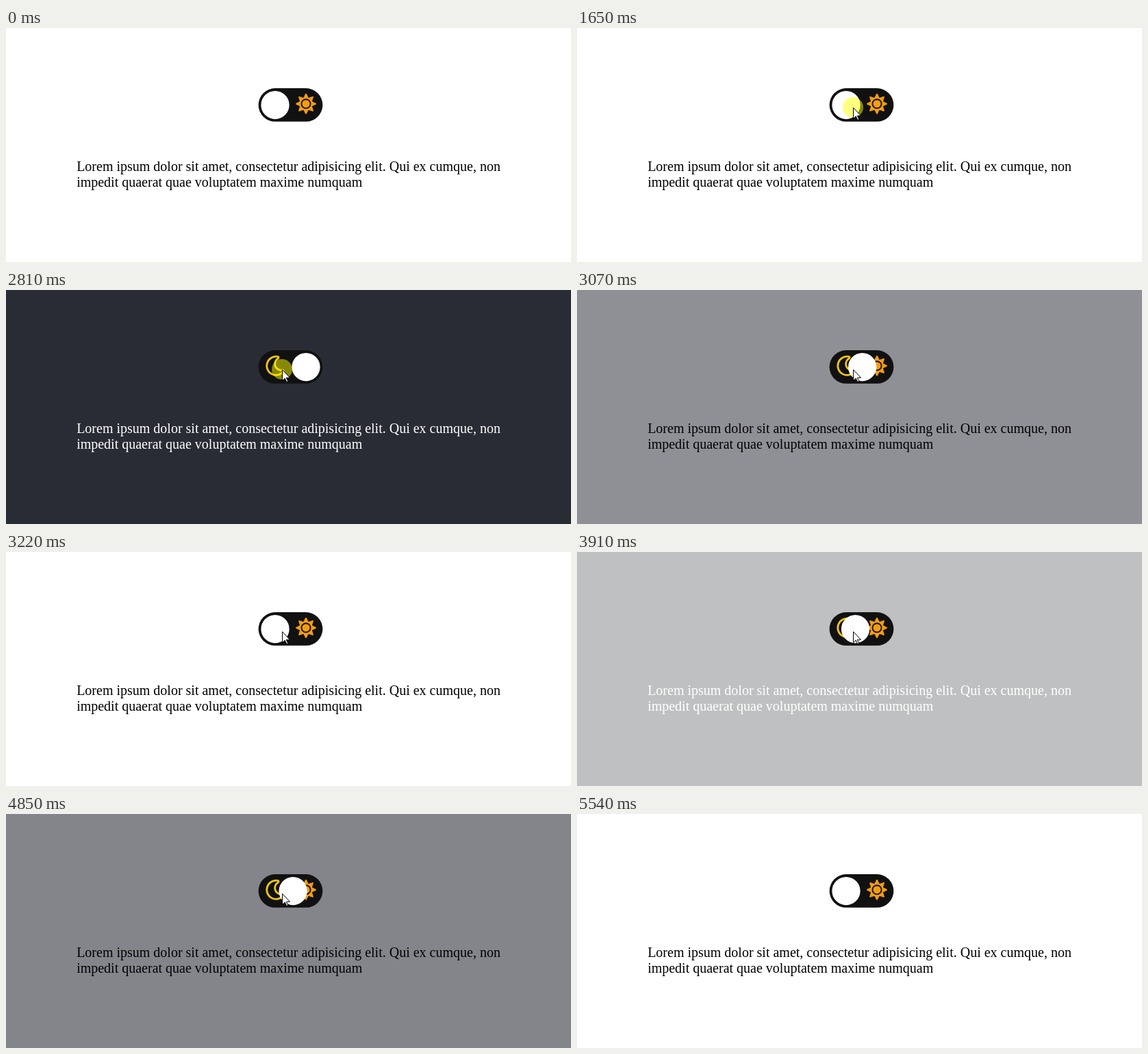
Recreate the animation shown at these times as an HTML page. Size 825x342 px, loop 6250 ms.

```html
<!DOCTYPE html>
<html lang="en">
<head>
<meta charset="utf-8">
<title>Dark mode toggle</title>
<style>
  html, body { margin: 0; width: 100%; height: 100%; overflow: hidden; background: #fff; }
  p {
    position: absolute; left: 103.125px; top: 191px; margin: 0; white-space: nowrap;
    font: 20px/23px "Liberation Serif", "Times New Roman", serif;
  }
  svg { position: absolute; left: 0; top: 0; }
</style>
</head>
<body>
<p>Lorem ipsum dolor sit amet, consectetur adipisicing elit. Qui ex cumque, non<br>impedit quaerat quae voluptatem maxime numquam</p>
<svg width="825" height="342">
  <rect x="368.6" y="88.1" width="93.75" height="48.75" rx="24.375" fill="#111"/>
  <path transform="translate(378 95.8) scale(.0586)" fill="#111" stroke="#f1c40f" stroke-width="96"
    stroke-linejoin="round" paint-order="stroke"
    d="M317 51.5A181 181 0 0 0 440.6 387A208 208 0 1 1 317 51.5z"/>
  <g transform="translate(438 110.8) scale(.0586)" fill="#f39c12">
    <polygon id="rays" stroke="#f39c12" stroke-width="34" stroke-linejoin="round"/>
    <circle r="112" stroke="#111" stroke-width="32"/>
  </g>
  <circle id="ball" cy="112.5" r="20.625" fill="#fff"/>
  <circle id="press" cx="403" cy="116" r="15" fill="#ff0" fill-opacity=".5"/>
  <path id="cursor" d="M.5 .5v16l3.7-3.5 2.6 5.5 2-1-2.5-5.3h5.2z" fill="#fff" stroke="#000"/>
</svg>
<script>
const LOOP = 6250, SLIDE = 200;
const LIGHT = [255, 255, 255], DARK = [41, 44, 53];

// Bursts of screen updates: first time, last time, number of updates
const bursts = [
  [140, 730, 9], [810, 1340, 8], [1650, 1650, 1], [1820, 2050, 4], [2810, 2810, 1],
  [2980, 3220, 4], [3760, 3760, 1], [3910, 4060, 3], [4610, 4610, 1], [4780, 5010, 4],
  [5160, 5540, 6]
];
const updates = bursts.flatMap(([from, to, count]) =>
  Array.from({ length: count }, (_, i) =>
    Math.floor((from + (to - from) * i / Math.max(1, count - 1)) / 10) * 10));

// Highlight on, highlight off, start of the switch
const clicks = [[1650, 1820, 1800], [2810, 2980, 2965], [3760, 3910, 3850], [4610, 4780, 4766]];

// Pointer path: time, x, y
const path = [
  [140, 612, 336], [440, 515, 322], [730, 441, 265], [960, 385, 205], [1110, 365, 150],
  [1220, 380, 108], [1340, 403, 116], [5090, 403, 116], [5240, 440, 145], [5460, 661, 307]
];

const [rays, ball, press, cursor] =
  ["rays", "ball", "press", "cursor"].map(id => document.getElementById(id));
const mix = (a, b, k) => a + (b - a) * k;
const clamp = k => Math.min(1, Math.max(0, k));

rays.setAttribute("points", Array.from({ length: 16 }, (_, i) => {
  const r = i % 2 ? 142 : 239, a = i * Math.PI / 8;
  return [r * Math.cos(a), r * Math.sin(a)];
}).join(" "));

function pointerAt(t) {
  const i = path.findIndex(p => p[0] >= t);
  if (i < 1) return path.at(i).slice(1);
  const [a, b] = [path[i - 1], path[i]], k = (t - a[0]) / (b[0] - a[0]);
  return [mix(a[1], b[1], k), mix(a[2], b[2], k)];
}

function draw(time) {
  const t = updates.findLast(u => u <= time) ?? 0;
  const done = clicks.filter(c => t >= c[2]);
  const isDark = done.length % 2 === 1;
  const slide = done.length ? clamp((t - done.at(-1)[2]) / SLIDE) : 1;
  const dark = isDark ? slide : 1 - slide;

  document.body.style.background = `rgb(${LIGHT.map((c, i) => Math.round(mix(c, DARK[i], dark)))})`;
  document.body.style.color = isDark ? "#fff" : "#000";
  ball.setAttribute("cx", mix(393, 438, dark));
  press.style.display = clicks.some(c => t >= c[0] && t < c[1]) ? "" : "none";
  cursor.style.display = t >= 140 && t < 5540 ? "" : "none";
  cursor.setAttribute("transform", `translate(${pointerAt(t).map(Math.round)})`);
}

const start = performance.now();
function tick() {
  draw((performance.now() - start) % LOOP);
  requestAnimationFrame(tick);
}
tick();
</script>
</body>
</html>
```
